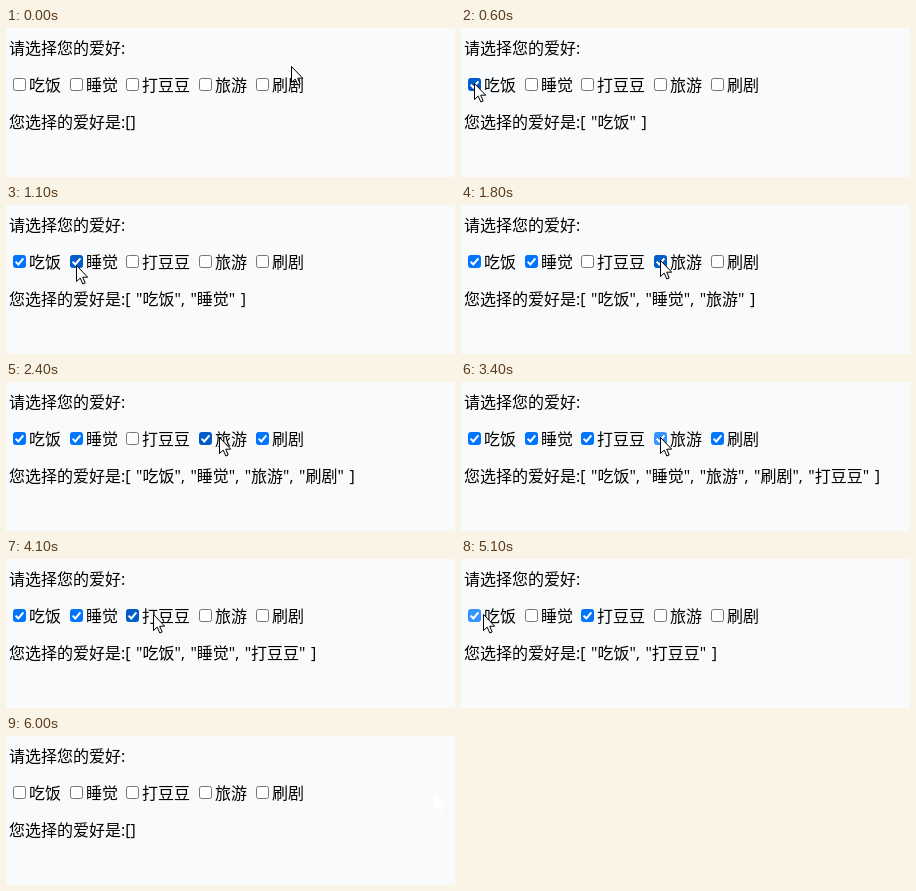
An HTML page for the animation above (6400 ms loop, 449x149 px).

```html
<!DOCTYPE html>
<html lang="zh-CN">
<head>
<meta charset="utf-8">
<title>爱好</title>
<style>
  html, body { margin: 0; width: 100%; height: 100%; overflow: hidden; background: #f8fafc; }
  svg { display: block; width: 449px; height: 149px; }
  text { font: 16px "Open Sans", "Noto Sans CJK SC", "Noto Sans CJK", sans-serif; word-spacing: 1.4px; fill: #000; }
  .box { --line: #767676; --on: #0075ff; }
  .box.hover { --line: #4f4f4f; --on: #005cc8; }
  .box.press { --line: #8d8d8d; --on: #3793ff; }
  .box rect { fill: #fff; stroke: var(--line); }
  .box path { fill: none; stroke: #fff; stroke-width: 2; visibility: hidden; }
  .box.on rect { fill: var(--on); stroke: var(--on); }
  .box.on path { visibility: visible; }
  #cursor { fill: #fff; stroke: #000; }
  #cursor.gone { stroke: #fff; }
</style>
</head>
<body>
<svg viewBox="0 0 449 149">
  <text x="3" y="26">请选择您的爱好:</text>
  <g id="options"></g>
  <text id="result" x="3" y="100"></text>
  <path id="cursor" d="M.5 .5V16.5L4.2 13.1L6.8 19L9.2 18L6.7 12.2H11.7Z"/>
</svg>
<script>
const LOOP = 6400, TICK = 100, EXIT = 60;
const byId = id => document.getElementById(id);
const cursor = byId("cursor"), result = byId("result"), options = byId("options");

// Options flow from left to right: box, label, gap
let flow = 7;
const items = ["吃饭", "睡觉", "打豆豆", "旅游", "刷剧"].map(name => {
  const width = name.length * 16, left = Math.round(flow);
  flow += width + 24.7;
  return { name, left, right: left + 16 + width };
});

options.innerHTML = items.map(({ name, left }) => `
  <g class="box" transform="translate(${left} 50)">
    <rect x=".5" y=".5" width="12" height="12" rx="2"/>
    <path d="M2.6 6.6L5.3 9.4L10.4 3.3"/>
  </g>
  <text x="${left + 16}" y="63">${name}</text>`).join("");
const boxes = [...options.querySelectorAll(".box")];

// The pointer arrives `rest` ticks before it leaves; the button is down for `hold` ticks
const stop = (x, y, leave, rest = 0) => ({ x, y, leave, arrive: leave - rest });
const visit = (name, leave, { rest = 1, hold = 1, dx = 6, y = 55 } = {}) => {
  const item = items.find(i => i.name === name);
  return { ...stop(item.left + dx, y, leave, rest), item, down: leave - hold };
};

const clicks = [
  visit("吃饭", 6),
  visit("睡觉", 11, { rest: 2, hold: 2, y: 60 }),
  visit("旅游", 18),
  visit("刷剧", 22),
  visit("打豆豆", 29),
  visit("旅游", 35),
  visit("刷剧", 39),
  visit("睡觉", 45, { rest: 2.6 }),
  visit("吃饭", 52, { rest: 4, dx: 15 }),
  visit("打豆豆", 57)
];
const stops = [stop(285, 38, 0), ...clicks, stop(427, 57, 64, 5)];

function pointer(tick) {
  const n = Math.max(1, stops.findIndex(s => s.leave >= tick));
  const a = stops[n - 1], b = stops[n];
  const k = Math.min(1, (tick - a.leave) / (b.arrive - a.leave));
  return [Math.round(a.x + (b.x - a.x) * k), Math.round(a.y + (b.y - a.y) * k)];
}

function chosen(tick) {
  const set = new Set();
  for (const { item, leave } of clicks) {
    if (leave <= tick && !set.delete(item)) set.add(item);
  }
  return [...set];
}

function draw(tick) {
  const [x, y] = pointer(tick), list = chosen(tick);
  items.forEach((item, i) => {
    const state = boxes[i].classList;
    state.toggle("on", list.includes(item));
    state.toggle("hover", x >= item.left && x < item.right && y >= 47 && y < 69);
    state.toggle("press", clicks.some(c => c.item === item && tick >= c.down && tick < c.leave));
  });
  const names = list.map(item => `"${item.name}"`).join(", ");
  result.textContent = "您选择的爱好是:" + (names ? `[ ${names} ]` : "[]");
  cursor.setAttribute("transform", `translate(${x} ${y})`);
  cursor.classList.toggle("gone", tick >= EXIT);
}

let last = -1;
function frame() {
  const tick = Math.floor(performance.now() % LOOP / TICK);
  if (tick !== last) draw(last = tick);
  requestAnimationFrame(frame);
}
frame();
</script>
</body>
</html>
```
